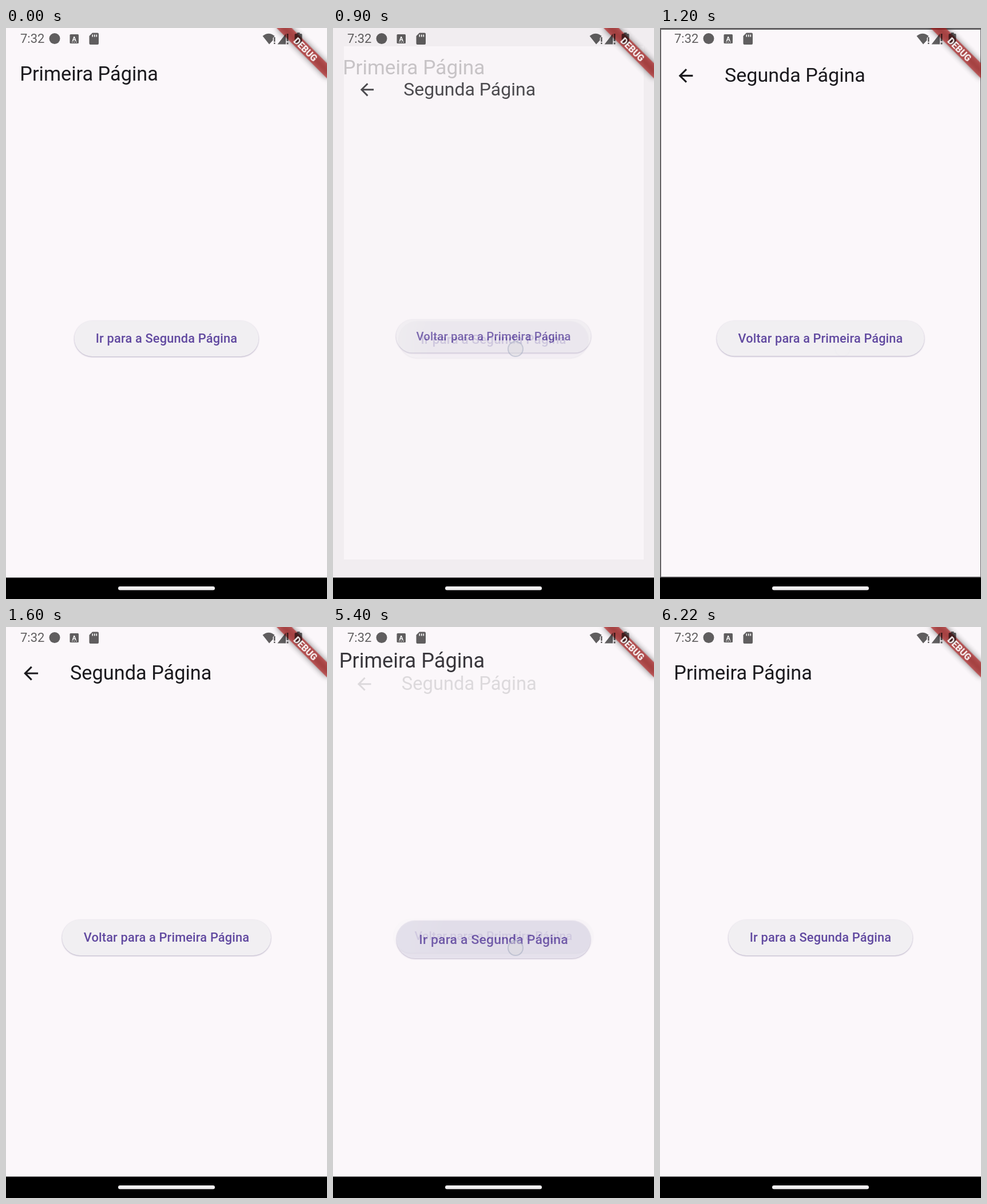
Animation of 561 by 998 pixels, one loop 8000 ms. Source, as an HTML page:

```html
<!DOCTYPE html>
<html lang="pt">
<head>
<meta charset="utf-8">
<title>Navegação entre páginas</title>
<style>
  html, body { margin: 0; width: 100%; height: 100%; overflow: hidden; background: #000; }
  svg { display: block; width: 100%; height: 100%; font-family: Roboto, sans-serif; }

  .surface { fill: #fbf7fa; }
  .title { font-size: 34.3px; fill: #1b1a1e; }
  .pill { fill: #f1eff2; filter: drop-shadow(0 1.4px 1px rgba(50, 35, 95, .35)); }
  .label { font-size: 21.8px; font-weight: 500; letter-spacing: .156px; fill: #6149a0; text-anchor: middle; }
  .status { fill: #000; opacity: .62; }
  .hole { fill: #fff; }

  .anim { animation: 8s linear infinite; }
  .page { transform-origin: 280.5px 480.3px; }
  .first { animation-name: first; }
  .second { animation-name: second; }
  .fade { animation-name: fade; }
  .scrim { animation-name: scrim; }
  .touch { animation-name: touch; }
  .ripple { transform-origin: 319px 561px; }
  .ripple1 { animation-name: ripple1; }
  .ripple2 { animation-name: ripple2; }

  /* Zoom transition: push 708-1580 ms, pop 5235-6107 ms, each in two eased segments. */
  @keyframes first {
    0% { transform: scale(1); }
    8.85% { transform: scale(1); animation-timing-function: cubic-bezier(.05, 0, .1333, .06); }
    10.667% { transform: scale(1.02); animation-timing-function: cubic-bezier(.2083, .82, .25, 1); }
    19.75% { transform: scale(1.05); animation-timing-function: step-end; }
    65.4375% { transform: scale(1.1); animation-timing-function: cubic-bezier(.05, 0, .1333, .06); }
    67.254% { transform: scale(1.06); animation-timing-function: cubic-bezier(.2083, .82, .25, 1); }
    76.3375%, 100% { transform: scale(1); }
  }
  @keyframes second {
    0% { transform: scale(.85); }
    8.85% { transform: scale(.85); animation-timing-function: cubic-bezier(.05, 0, .1333, .06); }
    10.667% { transform: scale(.91); animation-timing-function: cubic-bezier(.2083, .82, .25, 1); }
    19.75% { transform: scale(1); }
    65.4375% { transform: scale(1); animation-timing-function: cubic-bezier(.05, 0, .1333, .06); }
    67.254% { transform: scale(.96); animation-timing-function: cubic-bezier(.2083, .82, .25, 1); }
    76.3375%, 100% { transform: scale(.9); }
  }
  @keyframes fade {
    0%, 10.2125% { opacity: 0; }
    11.575%, 66.337% { opacity: 1; }
    67.699%, 100% { opacity: 0; }
  }
  @keyframes scrim {
    0%, 11.112% { opacity: 0; }
    13.401%, 19.75% { opacity: .6; }
    19.76%, 100% { opacity: 0; }
  }
  @keyframes touch {
    0%, 6.249% { opacity: 0; }
    6.25%, 8.85% { opacity: 1; }
    15.2%, 63.499% { opacity: 0; }
    63.5%, 65.4375% { opacity: 1; }
    71.7%, 100% { opacity: 0; }
  }
  @keyframes ripple1 {
    0%, 6.25% { opacity: 0; transform: scale(.1); }
    9.2% { opacity: .12; transform: scale(.5); }
    17%, 65.4375% { opacity: .12; transform: scale(1); }
    77.75%, 100% { opacity: 0; transform: scale(1); }
  }
  @keyframes ripple2 {
    0%, 63.5% { opacity: 0; transform: scale(.1); }
    66.45% { opacity: .12; transform: scale(.5); }
    74%, 100% { opacity: .12; transform: scale(1); }
  }
</style>
</head>
<body>
<svg viewBox="0 0 561 998">
  <defs>
    <clipPath id="pill1"><rect x="119.5" y="511.6" width="322" height="62.3" rx="31.15"/></clipPath>
    <clipPath id="pill2"><rect x="98" y="511.6" width="365" height="62.3" rx="31.15"/></clipPath>
    <radialGradient id="ink">
      <stop offset=".7" stop-color="#6149a0"/>
      <stop offset="1" stop-color="#6149a0" stop-opacity="0"/>
    </radialGradient>
    <filter id="soft" x="-20%" y="-150%" width="140%" height="400%"><feGaussianBlur stdDeviation="5.5"/></filter>
  </defs>

  <g class="anim page first">
    <rect class="surface" width="561" height="961"/>
    <text class="title" x="24.3" y="91.5">Primeira Página</text>
    <rect class="pill" x="119.5" y="511.6" width="322" height="62.3" rx="31.15"/>
    <g clip-path="url(#pill1)"><circle class="anim ripple ripple1" cx="319" cy="561" r="340" fill="url(#ink)"/></g>
    <text class="label" x="280.5" y="550.3">Ir para a Segunda Página</text>
  </g>

  <rect class="anim scrim" width="561" height="961"/>

  <g class="anim fade">
    <g class="anim page second">
      <rect class="surface" width="561" height="961"/>
      <path transform="translate(24.9 62.3) scale(1.558)" fill="#1b1a1e"
        d="M20 11H7.83l5.59-5.59L12 4l-8 8 8 8 1.41-1.41L7.83 13H20z"/>
      <text class="title" x="112" y="91.5">Segunda Página</text>
      <rect class="pill" x="98" y="511.6" width="365" height="62.3" rx="31.15"/>
      <g clip-path="url(#pill2)"><circle class="anim ripple ripple2" cx="319" cy="561" r="340" fill="url(#ink)"/></g>
      <text class="label" x="280.5" y="550.3">Voltar para a Primeira Página</text>
    </g>
  </g>

  <g transform="translate(561 0) rotate(45)">
    <rect x="-62.3" y="43.6" width="124.6" height="18.7" opacity=".5" filter="url(#soft)"/>
    <rect x="-62.3" y="43.6" width="124.6" height="18.7" fill="#b71c1c" fill-opacity=".63"/>
  </g>

  <g class="status">
    <text x="25" y="26" font-size="22">7:32</text>
    <circle cx="85" cy="18.5" r="9.5"/>
    <rect x="111.5" y="11" width="15.5" height="16" rx="1.5"/>
    <path d="M151 8.500h9a2 2 0 0 1 2 2v16.500a2 2 0 0 1-2 2h-12.500a2 2 0 0 1-2-2v-13z"/>
    <path d="M448.500 14q10.500-8.500 21 0l-3 3.500v4l-6.500 7z"/>
    <path d="M468 16h2.500v8h-2.500zM468 25.500h2.500v2.500h-2.500z"/>
    <path d="M474.500 28.500l14.500-18.500v18.500zM490.500 10h3v13h-3zM490.500 25.500h3v3h-3z"/>
    <path d="M508.500 8h5v2h2.500a1.500 1.500 0 0 1 1.500 1.500v15.500a1.500 1.500 0 0 1-1.500 1.500h-10a1.500 1.500 0 0 1-1.500-1.500v-15.500a1.500 1.500 0 0 1 1.500-1.500h2.500z"/>
  </g>
  <g class="hole">
    <text x="119.200" y="22.500" font-size="11" font-weight="700" text-anchor="middle">A</text>
    <path d="M115 24h1.500v1.300h-1.500zM118.500 24h1.500v1.300h-1.500zM122 24h1.500v1.300h-1.500z"/>
    <path d="M150.500 11.500h1.600v4h-1.600zM154 11.500h1.600v4h-1.600zM157.500 11.500h1.600v4h-1.600z"/>
    <text transform="translate(561 0) rotate(45)" y="58.5" font-size="15.9" font-weight="900" text-anchor="middle" opacity=".92">DEBUG</text>
  </g>

  <rect y="960.6" width="561" height="38"/>
  <rect x="196" y="976" width="169" height="6.5" rx="3.25" fill="#f1eff1"/>

  <g class="anim touch">
    <circle cx="319" cy="561" r="13" fill="#d9d9de" fill-opacity=".75" stroke="#a3abc0" stroke-opacity=".85" stroke-width="2"/>
  </g>
</svg>
</body>
</html>
```
